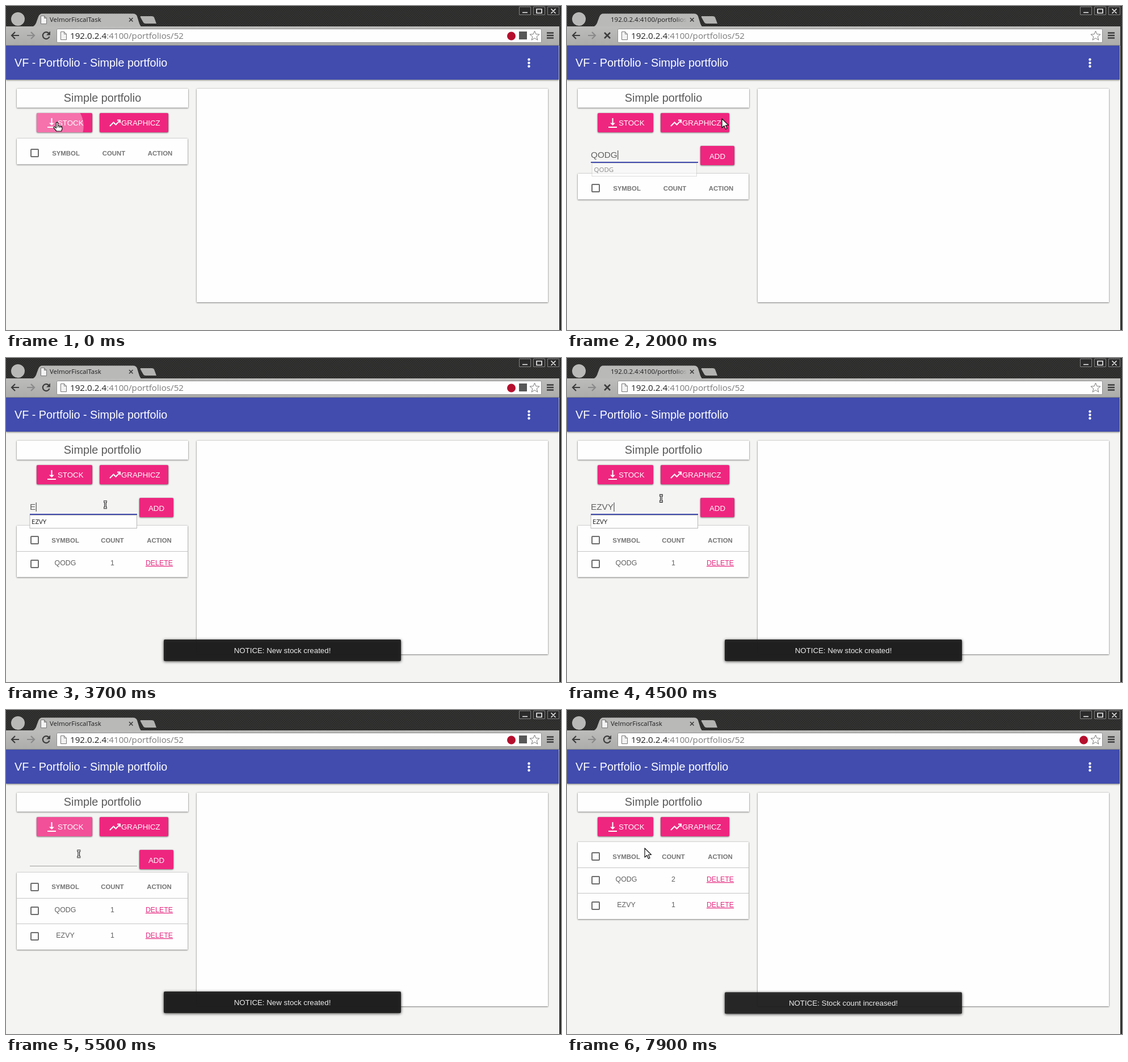
Animation of 978x572 px, one loop 8000 ms. Source, as an HTML page:

```html
<!DOCTYPE html>
<html lang="en">
<head>
<meta charset="utf-8">
<title>Portfolio</title>
<style>
  html, body { margin: 0; height: 100%; overflow: hidden; background: #f4f4f3; }
  svg { display: block; width: 978px; height: 572px; font-family: "Liberation Sans", Arial, sans-serif; }
  text { white-space: pre; }
  .ui { font-family: "Open Sans", "Noto Sans", sans-serif; }
  .mid { text-anchor: middle; }
  .card, .btn rect { filter: drop-shadow(0 0 1px #0004) drop-shadow(0 1px 1px #0006); }
  .card { fill: #fefefe; }
  .btn rect { fill: #ef267f; }
  .btn text { fill: #fff; font-size: 13.3px; }
  .line { fill: none; stroke: #fff; stroke-width: 2; }
  .dark { fill: none; stroke: #3c3c3c; stroke-width: 2.2; }
  .page { fill: #f2f2f2; stroke: #777; }
  .head text { font: bold 11.4px "Liberation Sans", Arial, sans-serif; fill: #757575; }
  .row text { font-size: 12.4px; fill: #606060; }
  .row .del { fill: #e62a80; text-decoration: underline; }
  .box { fill: none; stroke: #6c6c6c; stroke-width: 2; }
  .cursor { fill: #fff; stroke: #111; stroke-width: 1.2; stroke-linejoin: round; }
</style>
</head>
<body>
<svg viewBox="0 0 978 572">
  <defs>
    <pattern id="weave" width="4" height="4" patternUnits="userSpaceOnUse">
      <rect width="4" height="4" fill="#333332"/>
      <path d="M0 .5H2M2 2.5H4" stroke="#252525"/>
    </pattern>
    <linearGradient id="bar" x2="0" y2="1">
      <stop stop-color="#bdbdbc"/><stop offset="1" stop-color="#acacab"/>
    </linearGradient>
    <linearGradient id="fade" gradientUnits="userSpaceOnUse" x1="192" x2="211">
      <stop stop-color="#1c1c1c"/><stop offset="1" stop-color="#1c1c1c" stop-opacity="0"/>
    </linearGradient>
    <clipPath id="stockClip"><rect x="54" y="189" width="98" height="34" rx="2"/></clipPath>
    <clipPath id="formClip"><rect id="formArea" x="0" y="233" width="330" height="0"/></clipPath>
  </defs>

  <rect width="978" height="572" fill="#f4f4f3"/>

  <!-- window frame and tab -->
  <rect width="978" height="37" fill="url(#weave)"/>
  <g fill="#2b2b2b" stroke="#858585">
    <path d="M904.5 1.5h20v14h-20zM929.5 1.5h20v14h-20zM954.5 1.5h20v14h-20z"/>
    <path d="M910 11.5h9M935 5.5h9v7h-9zM960.5 5l8 8m0-8l-8 8" fill="none" stroke="#f0f0f0" stroke-width="1.6"/>
  </g>
  <circle cx="21" cy="23" r="12" fill="#b9b9b8"/>
  <path d="M46 37Q51 35 53 30L57 19Q59 13.5 64 13.5H224Q229 13.5 231 18L234 28Q236 35 239 37Z" fill="#b9b9b8"/>
  <path d="M238 18H257Q260 18 261 20L265 31H246Q243 31 242 29L237 20Q236 18 238 18Z" fill="#b3b3b2"/>
  <path id="tabIcon" class="page" d="M61.5 17.5h6l4 4v10h-10zM67.5 17.5v4h4"/>
  <text id="tabTitle" class="ui" x="77" y="28" font-size="11.5" fill="url(#fade)"></text>
  <path class="dark" d="M217 21l6.5 6.5m0-6.5l-6.5 6.5" style="stroke-width:1.6"/>

  <!-- toolbar -->
  <rect y="36" width="975" height="34" fill="url(#bar)"/>
  <path d="M0 69.5H975" stroke="#8b8b8b"/>
  <path class="dark" d="M23 52H11M16 46L10 52L16 58"/>
  <path class="dark" d="M37 52H49M44 46L50 52L44 58" style="stroke:#8a8a8a"/>
  <g id="reload"><path class="dark" d="M76 49A6 6 0 1 0 76.5 54"/><path d="M78 44.5V51.5H71Z" fill="#3c3c3c"/></g>
  <path id="stop" class="dark" d="M66 47l10 10m0-10l-10 10" style="stroke-width:2.6"/>
  <rect x="89.5" y="40.5" width="854" height="24" rx="2" fill="#fefefe" stroke="#8f8f8f"/>
  <path class="page" d="M96.5 45.5h6l4 4v10h-10zM102.5 45.5v4h4"/>
  <text class="ui" x="113" y="57.5" font-size="15.2" fill="#7b7b7b"><tspan fill="#222">192.0.2.4</tspan>:4100/portfolios/52</text>
  <circle id="badge" cy="53" r="7.5" fill="#b50f2e"/>
  <rect id="chip" x="904" y="45" width="14" height="14" fill="#585858"/>
  <path d="M931.5 44l2.3 5.7 6.2.4-4.8 4 1.6 6-5.3-3.4-5.3 3.4 1.6-6-4.8-4 6.2-.4z" fill="#fff" stroke="#777"/>
  <path class="dark" d="M953 47.5H965M953 52H965M953 56.5H965" style="stroke-width:2.5"/>

  <!-- app header -->
  <rect y="70" width="974" height="60" fill="#414cae" style="filter:drop-shadow(0 1px 1.5px #0008)"/>
  <text x="15" y="107" font-size="19.8" fill="#fff">VF - Portfolio - Simple portfolio</text>
  <g fill="#fff"><circle cx="921.5" cy="94.5" r="2.2"/><circle cx="921.5" cy="100.5" r="2.2"/><circle cx="921.5" cy="106.5" r="2.2"/></g>

  <!-- page -->
  <rect class="card" x="19" y="146" width="302" height="33.5"/>
  <text class="mid" x="170" y="169" font-size="19.8" fill="#595959">Simple portfolio</text>
  <rect class="card" x="336" y="146" width="619" height="377"/>

  <g class="btn">
    <rect x="54" y="189" width="98" height="34" rx="2"/>
    <rect x="165" y="189" width="121" height="34" rx="2"/>
    <circle id="ripple" cy="212" fill="#fff" clip-path="url(#stockClip)"/>
    <text x="91" y="210.5">STOCK</text>
    <text x="203" y="210.5">GRAPHICZ</text>
    <path class="line" d="M80.5 198V208M73 214H88"/>
    <path d="M76 206.5H85L80.5 211Z" fill="#fff"/>
    <path class="line" d="M183 212L189.5 205.5L193.5 209.5L200.5 202.5M196 201.5H201V206.5"/>
  </g>

  <g id="table">
    <rect id="sheet" class="card" x="19" width="301"/>
    <g class="head mid" id="head">
      <text y="29.5">SYMBOL</text><text y="29.5">COUNT</text><text y="29.5">ACTION</text>
    </g>
    <rect class="box" x="44" y="19" width="13" height="13" rx="1"/>
    <g id="rows"></g>
  </g>

  <g clip-path="url(#formClip)">
    <text id="field" x="42" y="268" font-size="15.3" fill="#606060"></text>
    <rect id="caret" y="255" width="1" height="16" fill="#333"/>
    <rect id="underline" x="42" y="275" width="189"/>
    <g class="btn"><rect x="235" y="247" width="60" height="34" rx="2"/><text x="251" y="269.5">ADD</text></g>
  </g>
  <g id="popup">
    <rect id="popupBox" y="277.5" height="23" fill="#fefefe" stroke="#b8b8b8"/>
    <text id="popupText" class="ui" y="292.5" font-size="11.5" fill="#1c1c1c"></text>
  </g>

  <g id="toast">
    <rect x="278" y="497" width="418" height="38" rx="2" fill="#1e1e1e" fill-opacity=".93" style="filter:drop-shadow(0 1px 2.5px #000c)"/>
    <text id="notice" class="mid" x="487" y="521" font-size="13.3" fill="#ececec"></text>
  </g>

  <rect x="975" y="36" width="3" height="536" fill="#30302f"/>

  <path id="arrow" class="cursor" d="M0 0V16L4 12.5L6.5 18.5L9 17.3L6.5 11.5H11.5Z"/>
  <path id="hand" class="cursor" d="M-1.5 0Q0-1.5 1.5 0V5L7 6Q9 6.5 9 8.5V11L7.5 15H-1L-6 9Q-6 6.5-4 7.5L-1.5 9.5ZM1.5 5V8.5M4.5 5.5V9M7 6V9"/>
  <g id="beam">
    <path d="M-3-5.5H3M-3 5.5H3M0-5.5V5.5" stroke="#111" stroke-width="3.6"/>
    <path d="M-2.5-5.5H2.5M-2.5 5.5H2.5M0-5.5V5.5" stroke="#fff" stroke-width="1.4"/>
  </g>
</svg>
<script>
const LOOP = 8000, FIRST = 'QODG', SECOND = 'EZVY';
const $ = id => document.getElementById(id);
const set = (id, attrs) => { for (const k in attrs) $(id).setAttribute(k, attrs[k]); };
const show = (id, on) => { $(id).style.display = on ? '' : 'none'; };
const write = (id, text) => { if ($(id).textContent !== text) $(id).textContent = text; };
const clamp = x => Math.max(0, Math.min(1, x));
const swing = x => .5 - Math.cos(clamp(x) * Math.PI) / 2;
const outCubic = x => 1 - (1 - clamp(x)) ** 3;

// One entry per page visit: press STOCK, type a symbol, submit, wait for the next page.
const visits = [
  { press: -100, focus: 900, typed: [[1200, 1], [1300, 2], [1500, 4]], symbol: FIRST,
    spin: 1700, leave: 1900, load: 2200, counts: [] },
  { press: 2600, focus: 3400, typed: [[3700, 1], [4100, 4]], symbol: SECOND,
    spin: 4300, leave: 4500, load: 4600, counts: [1] },
  { press: 5000, focus: 6100, typed: [[6500, 1], [6800, 2], [7100, 4]], symbol: FIRST,
    spin: 7300, leave: 7500, load: 7700, counts: [1, 1] },
  { press: 1e5, focus: 1e5, typed: [], symbol: '', spin: 1e5, leave: 1e5, load: 1e5, counts: [2, 1] }
];

// time, x, y of the pointer's hot spot
const pointer = [
  [0, 90, 206], [200, 90, 206], [900, 150, 259], [1500, 150, 259], [2000, 273, 199],
  [2600, 110, 198], [3100, 110, 200], [3400, 175, 259], [4100, 175, 259], [4300, 180, 262],
  [4900, 124, 206], [5200, 124, 206], [5600, 129, 262], [6100, 129, 262], [6500, 129, 259],
  [7100, 129, 259], [7300, 161, 262], [7550, 161, 262], [7900, 137, 244], [8000, 131, 236]
];

$('rows').innerHTML = [FIRST, SECOND].map((name, i) => {
  const y = 45 * i;
  return `<g class="row" id="row${i}">
    <path d="M19 ${y + 45.5}H320" stroke="#c4c4c4"/>
    <rect class="box" x="44" y="${y + 61}" width="13" height="13" rx="1"/>
    <text class="mid" x="104.5" y="${y + 70}">${name}</text>
    <text class="mid" x="187.5" y="${y + 70}" id="count${i}"></text>
    <text class="mid del" x="270" y="${y + 70}">DELETE</text></g>`;
}).join('');

function drawBrowser(t, visit, since) {
  const leaving = t >= visit.leave, busy = t >= visit.spin;
  write('tabTitle', leaving ? '192.0.2.4:4100/portfolios' : 'VelmorFiscalTask');
  show('tabIcon', !busy);
  show('reload', !busy);
  show('stop', busy);
  const settled = since >= 400;
  show('badge', !leaving);
  show('chip', settled && !leaving);
  set('badge', { cx: settled ? 890.5 : 910.5 });
}

function drawTable(visit, open) {
  const rows = visit.counts.length;
  const top = (rows ? 233 : 234) + (rows ? 63 : 62) * open;
  set('table', { transform: `translate(0 ${top})` });
  set('sheet', { height: 45.5 + 45.3 * rows });
  const columns = rows ? [104.5, 187.5, 270] : [105.5, 190, 271.5];
  columns.forEach((x, i) => $('head').children[i].setAttribute('x', x));
  for (let i = 0; i < 2; i++) {
    show('row' + i, i < rows);
    write('count' + i, String(visit.counts[i] ?? ''));
  }
}

function drawForm(t, visit, open) {
  const typed = visit.typed.filter(([at]) => t >= at).pop();
  const focused = t >= visit.focus;
  set('formArea', { height: 63 * open });
  write('field', typed ? visit.symbol.slice(0, typed[1]) : '');
  show('caret', focused);
  set('caret', { x: 42.5 + (typed && open ? $('field').getComputedTextLength() : 0) });
  set('underline', focused ? { height: 2, fill: '#414cae' } : { height: 1, fill: '#9e9e9e' });

  const gone = clamp((t - visit.leave) / 200);
  show('popup', typed && gone < 1);
  set('popup', { opacity: 1 - gone });
  set('popupBox', { x: 42 + 4 * gone, width: 188.5 - 8 * gone });
  set('popupText', { x: 45 + 5 * gone });
  write('popupText', visit.symbol);
}

function drawRipple(t, visit) {
  const age = t - visit.press;
  show('ripple', age > 0 && age < 800);
  set('ripple', {
    cx: visit.press < 0 ? 90 : visit.press < 4000 ? 110 : 124,
    r: 110 * outCubic(age / 600),
    opacity: .35 * (1 - clamp((age - 300) / 450))
  });
}

function drawToast(visit, since, index) {
  const p = outCubic(since / 300);
  show('toast', index > 0);
  set('toast', { opacity: p, transform: `translate(0 ${35 * (1 - p)})` });
  write('notice', index === 3 ? 'NOTICE: Stock count increased!' : 'NOTICE: New stock created!');
}

function drawPointer(t, open) {
  const i = pointer.findIndex(([at]) => at > t);
  const [t0, x0, y0] = pointer[i - 1], [t1, x1, y1] = pointer[i];
  const p = swing((t - t0) / (t1 - t0));
  const x = x0 + (x1 - x0) * p, y = y0 + (y1 - y0) * p;
  const onStock = x > 54 && x < 152 && y > 189 && y < 223;
  const onField = open > .5 && x > 42 && x < 231 && y > 247 && y < 276;
  const kind = onStock ? 'hand' : onField ? 'beam' : 'arrow';
  for (const id of ['arrow', 'hand', 'beam']) show(id, id === kind);
  set(kind, { transform: `translate(${x} ${y})` });
}

function draw(t) {
  const index = visits.findIndex(v => t < v.load), visit = visits[index];
  const since = index ? t - visits[index - 1].load : 1e4;
  const open = swing((t - visit.press - 200) / 400);
  drawBrowser(t, visit, since);
  drawTable(visit, open);
  drawForm(t, visit, open);
  drawRipple(t, visit);
  drawToast(visit, since, index);
  drawPointer(t, open);
}

function tick() {
  draw(performance.now() % LOOP);
  requestAnimationFrame(tick);
}
tick();
</script>
</body>
</html>
```
